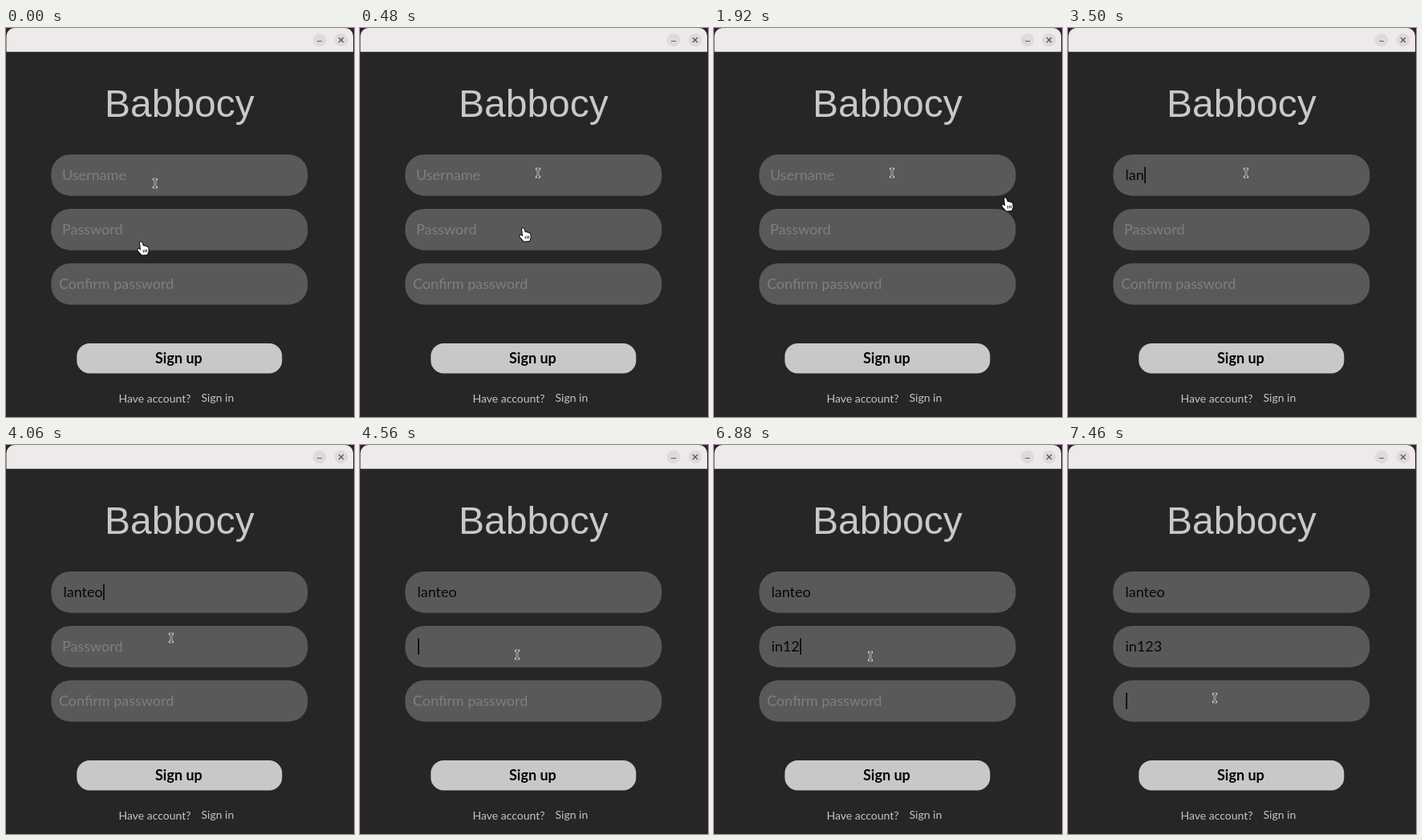
Write an HTML page with a canvas that moves like this. It is 434 px wide and 486 px high and loops after 8 s.

```html
<!DOCTYPE html>
<html lang="en">
<head>
<meta charset="utf-8">
<title>Sign up form</title>
<style>
html, body { margin: 0; width: 434px; height: 486px; overflow: hidden; background: #262626; }
canvas { display: block; }
</style>
</head>
<body>
<canvas id="stage" width="434" height="486"></canvas>
<script>
const ctx = document.getElementById('stage').getContext('2d');
const LOOP = 8000;
const UI = 'Lato, "Open Sans", sans-serif';
const TITLE = '"Liberation Sans", Arial, sans-serif';

// Each field: typed text over time, plus the span in which it has focus.
const fields = [
  { y: 158, hint: 'Username', hintX: 70, focus: [1960, 4320],
    typed: [[3120, 'lan'], [3740, 'lant'], [3820, 'lante'], [3920, 'lanteo']] },
  { y: 226, hint: 'Password', hintX: 70, focus: [4320, 7440],
    typed: [[6280, 'in1'], [6800, 'in12'], [6920, 'in123']] },
  { y: 294, hint: 'Confirm password', hintX: 66, focus: [7440, LOOP], typed: [] }
];

const linear = k => k;
const easeIn = k => k * k;
const easeOut = k => 1 - (1 - k) * (1 - k);
const smooth = k => k * k * (3 - 2 * k);

// Waypoints: time, x, y, easing of the leg that ends there.
const beamPath = [
  [0, 186, 194], [470, 222, 181, smooth],
  [3800, 222, 181, linear], [4060, 206, 241, easeIn], [4160, 196, 262, easeOut],
  [6560, 196, 262, linear], [6660, 195, 264, linear],
  [6860, 195, 264, linear], [7320, 183, 316, smooth]
];
const handPath = [[0, 171, 275], [480, 206, 258, easeIn], [1200, 366, 220, easeOut]];
const HAND_END = 2360;

function along(path, t) {
  for (let i = 1; i < path.length; i++) {
    const [t1, x1, y1, ease] = path[i];
    if (t >= t1) continue;
    const [t0, x0, y0] = path[i - 1];
    const k = ease((t - t0) / (t1 - t0));
    return [x0 + (x1 - x0) * k, y0 + (y1 - y0) * k];
  }
  return path[path.length - 1].slice(1, 3);
}

function box(x, y, w, h, r, fill) {
  ctx.beginPath();
  ctx.roundRect(x, y, w, h, r);
  ctx.fillStyle = fill;
  ctx.fill();
}

function label(str, x, y, font, fill) {
  ctx.font = font;
  ctx.fillStyle = fill;
  ctx.fillText(str, x, y);
}

function line(points, color, width) {
  ctx.beginPath();
  points.forEach(([x, y], i) => i % 2 ? ctx.lineTo(x, y) : ctx.moveTo(x, y));
  ctx.strokeStyle = color;
  ctx.lineWidth = width;
  ctx.stroke();
}

function drawWindow() {
  ctx.fillStyle = '#3b1a35';
  ctx.fillRect(0, 0, 434, 486);
  box(1, 1, 432, 485, [10, 10, 0, 0], '#262626');
  box(0.5, 0, 432.5, 29.8, [10, 10, 0, 0], '#eeeae9');
  for (const x of [391, 418]) {
    ctx.beginPath();
    ctx.arc(x, 15, 8.3, 0, Math.PI * 2);
    ctx.fillStyle = '#dedad9';
    ctx.fill();
  }
  ctx.lineCap = 'butt';
  line([[388, 16.5], [394, 16.5]], '#6a6666', 1.1);
  line([[415, 12], [421, 18], [421, 12], [415, 18]], '#5a5656', 1.4);
  label('Babbocy', 123, 111, '48px ' + TITLE, '#c8c8c8');
  box(88.3, 394, 256, 37.5, 16, '#c8c8c8');
  label('Sign up', 186, 419, 'bold 18px ' + UI, '#050505');
  label('Have account?', 140.5, 467.5, '14px ' + UI, '#c4c4c4');
  label('Sign in', 243.5, 467, '14px ' + UI, '#c4c4c4');
}

function drawField(f, t) {
  const font = '18px ' + UI;
  const [start, end] = f.focus;
  const focused = t >= start && t < end;
  let str = '', since = start;
  for (const [at, s] of f.typed) if (t >= at) { str = s; since = at; }

  box(56.3, f.y, 320, 51.7, 24, '#595959');
  if (t < start) {
    label(f.hint, f.hintX, f.y + 32, font, '#7e7e7e');
    return;
  }
  label(str, 71.5, f.y + 32, font, '#080808');
  // Caret: 800 ms on, 400 ms off, steady while text is being entered.
  if (focused && (str || (t - since) % 1200 < 800)) {
    const cx = Math.round(71.5 + ctx.measureText(str).width);
    ctx.fillStyle = '#050505';
    ctx.fillRect(cx + 0.2, f.y + 15.5, 1.6, 20.5);
  }
}

function drawBeam([x, y]) {
  ctx.save();
  ctx.translate(Math.round(x), Math.round(y));
  ctx.lineCap = 'butt';
  const bar = d => [[0, -5 - d], [0, 5 + d], [-2 - d, -5], [2 + d, -5], [-2 - d, 5], [2 + d, 5]];
  line(bar(1), '#e4e4e4', 2.6);
  line(bar(0), '#202020', 1);
  ctx.restore();
}

function drawHand([x, y]) {
  ctx.save();
  ctx.translate(Math.round(x), Math.round(y));
  const hand = new Path2D(
    'M-4 -7 Q-2.5 -8.5 -1.3 -6.5 L0 -2.5 Q1.2 -3.5 2.2 -2.2 Q3.5 -3 4.3 -1.6 ' +
    'Q6 -2 6.4 0 L6.6 4 L5.2 8 L-1.5 8.5 L-6 3.5 Q-7.3 1.3 -5.6 .8 L-2.8 2.6 Z');
  ctx.lineJoin = 'round';
  ctx.strokeStyle = '#0a0a0a';
  ctx.lineWidth = 2;
  ctx.stroke(hand);
  ctx.fillStyle = '#fff';
  ctx.fill(hand);
  ctx.lineCap = 'butt';
  line([[0, 2], [.4, 5.5], [2.2, 1.7], [2.6, 5.2], [4.3, 1.5], [4.5, 5]], '#222', 1);
  ctx.restore();
}

function render(t) {
  drawWindow();
  fields.forEach(f => drawField(f, t));
  drawBeam(along(beamPath, t));
  if (t < HAND_END) drawHand(along(handPath, t));
}

const begun = performance.now();
function tick() {
  render((performance.now() - begun) % LOOP);
  requestAnimationFrame(tick);
}
tick();
</script>
</body>
</html>
```
